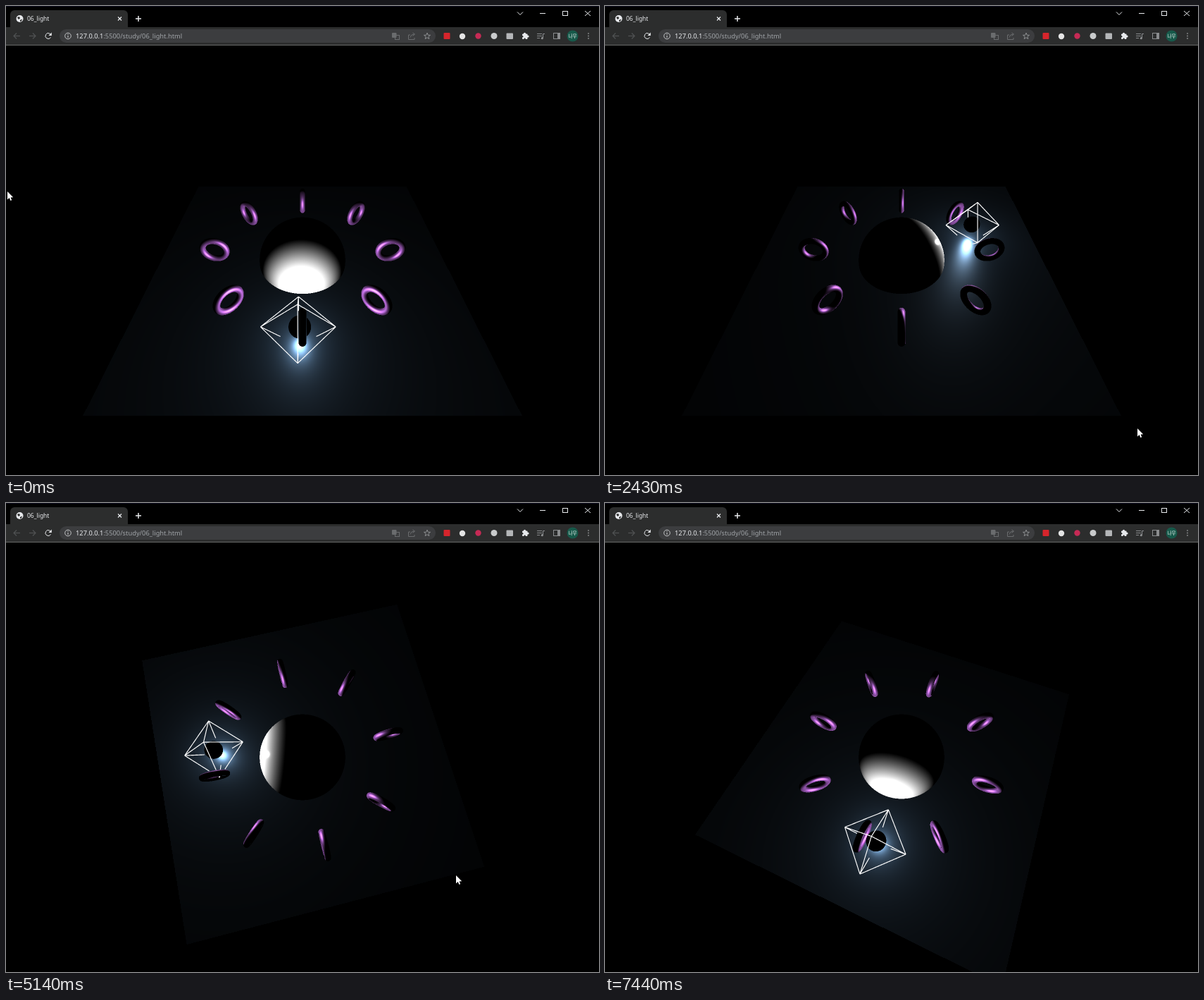
An HTML page with a canvas for the animation above (7.48 s loop, 842 by 665 pixels).

```html
<!DOCTYPE html>
<html lang="en">
<head>
<meta charset="utf-8">
<title>06_light</title>
<style>
  html, body { margin: 0; width: 100%; height: 100%; overflow: hidden; background: #000; }
  canvas { display: block; }
</style>
</head>
<body>
<canvas id="stage" width="842" height="665"></canvas>
<script>
const ctx = document.getElementById('stage').getContext('2d');
const W = 842, H = 609, TOP = 56, LOOP = 7480;
const RAD = Math.PI / 180;
const FOCAL = H / 2 / Math.tan(37.5 * RAD);
const DIST = Math.hypot(7, 7), FAR = 1e9, POWER = 2;
const { sqrt, sin, cos, min, max, floor, ceil } = Math;

// Rows of [time, ...values]
const LIGHT = [[0, -1.43], [1560, 74.5], [2430, 117.9], [4170, 205], [5140, 253.2], [6140, 303.1], [7480, 370.3]];
const ORBIT = [[4630, 90, 45], [5140, 76.4, 9.6], [5280, 75.8, 9.6], [5400, 76.2, 9.6], [6140, 110.3, 22.2], [6300, 112.9, 22.7]];
const MOUSE = [[60, 2, 263], [1560, 541, 542], [2430, 756, 599], [2700, 765, 592], [3870, 765, 592], [4170, 702, 575],
  [4600, 616, 468], [5140, 639, 528], [5280, 640, 528], [5400, 639, 528], [6140, 579, 506], [6300, 575, 505],
  [6560, 774, 610], [6880, 775, 672]];

function keyed(rows, t, ease) {
  if (t <= rows[0][0]) return rows[0].slice(1);
  let i = 1;
  while (i < rows.length && rows[i][0] < t) i++;
  if (i === rows.length) return rows[i - 1].slice(1);
  const a = rows[i - 1], b = rows[i];
  let k = (t - a[0]) / (b[0] - a[0]);
  if (ease) k = k * k * (3 - 2 * k);
  return a.slice(1).map((v, n) => v + (b[n + 1] - v) * k);
}

function material(r, g, b, metal, rough) {
  const base = [r / 255, g / 255, b / 255];
  return {
    rough,
    diff: base.map(c => c * (1 - metal)),
    spec: base.map(c => 0.04 + (c - 0.04) * metal)
  };
}
const GROUND = material(44, 62, 80, 0.5, 0.5);
const WHITE = material(255, 255, 255, 0.2, 0.1);
const PURPLE = material(155, 89, 182, 0.9, 0.5);
const RED = material(231, 76, 60, 0.5, 0.2);

const image = ctx.createImageData(W, H), pix = image.data;
const depth = new Float32Array(W * H);
const cam = { x: 0, y: 0, z: 0, right: [], up: [], fwd: [] };
const rgb = [0, 0, 0], norm = [0, 0, 0];
let lamp = [0, 0, 0];

function lampAt(deg) {
  return [3 * cos(deg * RAD), 0.5, -3 * sin(deg * RAD)];
}

function aim(azimuth, polar) {
  const sa = sin(azimuth * RAD), ca = cos(azimuth * RAD);
  const sp = sin(polar * RAD), cp = cos(polar * RAD);
  cam.x = DIST * sp * sa; cam.y = DIST * cp; cam.z = DIST * sp * ca;
  cam.right = [ca, 0, -sa];
  cam.up = [-cp * sa, sp, -cp * ca];
  cam.fwd = [-sp * sa, -cp, -sp * ca];
}

function project(p) {
  const x = p[0] - cam.x, y = p[1] - cam.y, z = p[2] - cam.z;
  const along = v => x * v[0] + y * v[1] + z * v[2];
  const d = along(cam.fwd);
  return [W / 2 + along(cam.right) * FOCAL / d, H / 2 - along(cam.up) * FOCAL / d, d];
}

// Lambert + GGX under one point light; radius > 0 widens the lobe on tight curves
function shade(px, py, pz, nx, ny, nz, m, radius, t) {
  rgb[0] = rgb[1] = rgb[2] = 0;
  let lx = lamp[0] - px, ly = lamp[1] - py, lz = lamp[2] - pz;
  let s = 1 / sqrt(lx * lx + ly * ly + lz * lz);
  lx *= s; ly *= s; lz *= s;
  const nl = nx * lx + ny * ly + nz * lz;
  if (nl <= 0) return;
  let vx = cam.x - px, vy = cam.y - py, vz = cam.z - pz;
  s = 1 / sqrt(vx * vx + vy * vy + vz * vz);
  vx *= s; vy *= s; vz *= s;
  const nv = max(0.001, nx * vx + ny * vy + nz * vz);
  const hx = lx + vx, hy = ly + vy, hz = lz + vz;
  s = 1 / sqrt(hx * hx + hy * hy + hz * hz);
  const nh = (nx * hx + ny * hy + nz * hz) * s;
  const vh = (vx * hx + vy * hy + vz * hz) * s;
  let rough = m.rough;
  if (radius) rough = min(1, rough + 0.8 * t / (FOCAL * radius * max(nv, 0.3)));
  const a2 = rough * rough * rough * rough;
  const q = nh * nh * (a2 - 1) + 1;
  const vis = 0.5 / (nl * sqrt(a2 + (1 - a2) * nv * nv) + nv * sqrt(a2 + (1 - a2) * nl * nl));
  const lobe = a2 / (q * q) * vis;
  const fr = Math.pow(2, (-5.55473 * vh - 6.98316) * vh);
  for (let c = 0; c < 3; c++)
    rgb[c] = min(1, POWER * nl * (m.diff[c] + lobe * (m.spec[c] * (1 - fr) + fr)));
}

function drawGround() {
  const { right: r, up: u, fwd: f } = cam;
  let k = 0;
  for (let j = 0; j < H; j++) {
    const y = (H / 2 - j - 0.5) / FOCAL;
    for (let i = 0; i < W; i++, k += 4) {
      const x = (i + 0.5 - W / 2) / FOCAL;
      pix[k] = pix[k + 1] = pix[k + 2] = 0;
      pix[k + 3] = 255;
      const dy = f[1] + u[1] * y;
      if (dy >= 0) continue;
      const t = -cam.y / dy;
      const px = cam.x + t * (f[0] + r[0] * x + u[0] * y);
      const pz = cam.z + t * (f[2] + r[2] * x + u[2] * y);
      if (px < -5 || px > 5 || pz < -5 || pz > 5) continue;
      shade(px, 0, pz, 0, 1, 0, GROUND, 0, t);
      pix[k] = rgb[0] * 255;
      pix[k + 1] = rgb[1] * 255;
      pix[k + 2] = rgb[2] * 255;
    }
  }
}

// Each solid: centre, bounding radius, curve radius, material, and a trace
// from the bounding sphere that returns the depth (0 = miss) and sets norm.
function ball(center, r, mat, half) {
  return {
    center, bound: r, curve: r, mat,
    trace(ox, oy, oz, dx, dy, dz, t) {
      const y = oy + dy * t;
      if (half && y < 0) return 0;
      norm[0] = (ox + dx * t) / r;
      norm[1] = y / r;
      norm[2] = (oz + dz * t) / r;
      return t;
    }
  };
}

function ring(deg) {
  const c = cos(deg * RAD), s = sin(deg * RAD);
  return {
    center: [3 * c, 0.5, -3 * s], bound: 0.505, curve: 0.1, mat: PURPLE,
    trace(ox, oy, oz, dx, dy, dz, t, end, len) {
      const u0 = ox * c - oz * s, u1 = dx * c - dz * s;
      const z0 = ox * s + oz * c, z1 = dx * s + dz * c;
      for (let n = 0; n < 40 && t < end; n++) {
        const u = u0 + u1 * t, y = oy + dy * t, z = z0 + z1 * t;
        const k = sqrt(u * u + y * y), q = k - 0.4;
        const e = sqrt(q * q + z * z), gap = e - 0.1;
        if (gap < 0.001) {
          const nu = q * u / k / e, nz = z / e;
          norm[0] = nu * c + nz * s;
          norm[1] = q * y / k / e;
          norm[2] = nz * c - nu * s;
          return t;
        }
        t += gap / len;
      }
      return 0;
    }
  };
}

const rings = Array.from({ length: 8 }, (_, i) => ring(i * 45));
const dome = ball([0, 0, 0], 1.5, WHITE, true);

function drawSolid(o) {
  const { right: r, up: u, fwd: f } = cam;
  const [sx, sy, sd] = project(o.center);
  const reach = o.bound * FOCAL / (sd - o.bound) * 1.15 + 2;
  const ox = cam.x - o.center[0], oy = cam.y - o.center[1], oz = cam.z - o.center[2];
  const cc = ox * ox + oy * oy + oz * oz - o.bound * o.bound;
  const i1 = min(W, ceil(sx + reach)), j1 = min(H, ceil(sy + reach));
  for (let j = max(0, floor(sy - reach)); j < j1; j++) {
    for (let i = max(0, floor(sx - reach)); i < i1; i++) {
      const at = j * W + i;
      let hits = 0, near = FAR, cr = 0, cg = 0, cb = 0;
      for (let n = 0; n < 4; n++) {
        const x = (i + 0.25 + (n & 1) / 2 - W / 2) / FOCAL;
        const y = (H / 2 - j - 0.25 - (n >> 1) / 2) / FOCAL;
        const dx = f[0] + r[0] * x + u[0] * y;
        const dy = f[1] + u[1] * y;
        const dz = f[2] + r[2] * x + u[2] * y;
        const a = dx * dx + dy * dy + dz * dz, b = ox * dx + oy * dy + oz * dz;
        const disc = b * b - a * cc;
        if (disc < 0) continue;
        const root = sqrt(disc);
        const t = o.trace(ox, oy, oz, dx, dy, dz, (-b - root) / a, (-b + root) / a, sqrt(a));
        if (!t || t > depth[at]) continue;
        shade(cam.x + dx * t, cam.y + dy * t, cam.z + dz * t, norm[0], norm[1], norm[2], o.mat, o.curve, t);
        hits++;
        near = min(near, t);
        cr += rgb[0]; cg += rgb[1]; cb += rgb[2];
      }
      if (!hits) continue;
      const keep = 1 - hits / 4, k = at * 4;
      pix[k] = pix[k] * keep + cr * 63.75;
      pix[k + 1] = pix[k + 1] * keep + cg * 63.75;
      pix[k + 2] = pix[k + 2] * keep + cb * 63.75;
      if (hits > 1) depth[at] = near;
    }
  }
}

function drawEdge(a, b) {
  const STEPS = 48;
  const point = k => project(a.map((v, i) => v + (b[i] - v) * k / STEPS));
  let open = false;
  for (let n = 0; n <= STEPS; n++) {
    const [x, y, d] = point(n);
    const i = floor(x), j = floor(y);
    const seen = i < 0 || j < 0 || i >= W || j >= H || d < depth[j * W + i];
    if (seen && open) ctx.lineTo(x, y + TOP);
    else if (seen) ctx.moveTo(x, y + TOP);
    open = seen;
  }
}

// Octahedron around the lamp; its lower half stops at the ground
function drawHelper([x, y, z]) {
  const belt = [[x + 1, y, z], [x, y, z + 1], [x - 1, y, z], [x, y, z - 1]];
  ctx.beginPath();
  belt.forEach((p, i) => {
    drawEdge(p, belt[(i + 1) % 4]);
    drawEdge([x, y + 1, z], p);
    drawEdge(p, [(p[0] + x) / 2, 0, (p[2] + z) / 2]);
  });
  ctx.strokeStyle = '#fff';
  ctx.lineWidth = 1.15;
  ctx.stroke();
}

function drawMouse(x, y) {
  poly([[0, 0], [0, 11.5], [2.7, 9.1], [4.4, 13], [6.2, 12.2], [4.6, 8.4], [8.2, 8.3]].map(p => [p[0] + x, p[1] + y]), true);
  ctx.strokeStyle = '#000';
  ctx.lineWidth = 1;
  ctx.stroke();
  ctx.fillStyle = '#fff';
  ctx.fill();
}

function poly(points, close) {
  ctx.beginPath();
  points.forEach(p => ctx.lineTo(p[0], p[1]));
  if (close) ctx.closePath();
}
function line(color, width, ...points) {
  poly(points);
  ctx.strokeStyle = color;
  ctx.lineWidth = width;
  ctx.stroke();
}
function disc(x, y, r, color) {
  ctx.beginPath();
  ctx.arc(x, y, r, 0, 7);
  ctx.fillStyle = color;
  ctx.fill();
}
function circle(x, y, r, color, from = 0, to = 7) {
  ctx.beginPath();
  ctx.arc(x, y, r, from, to);
  ctx.strokeStyle = color;
  ctx.lineWidth = 1;
  ctx.stroke();
}
function box(x, y, w, h, r, color) {
  ctx.beginPath();
  ctx.roundRect(x, y, w, h, r);
  ctx.fillStyle = color;
  ctx.fill();
}
function frame(x, y, w, h, color) {
  ctx.strokeStyle = color;
  ctx.lineWidth = 1;
  ctx.strokeRect(x, y, w, h);
}
function text(str, x, y, size, color, family = '"Noto Sans", "Open Sans", sans-serif') {
  ctx.font = size + 'px ' + family;
  ctx.fillStyle = color;
  ctx.fillText(str, x, y);
  return x + ctx.measureText(str).width;
}

function drawBrowser() {
  const bar = '#2c2d2d', dim = '#505253', soft = '#8a8c8e', lit = '#e8eaed';
  ctx.fillStyle = '#000';
  ctx.fillRect(0, 0, W, TOP);
  ctx.fillStyle = '#0c0c1c';
  ctx.fillRect(0, 0, W, 1);
  box(6, 6, 167, 30, 6, bar);
  ctx.fillStyle = bar;
  ctx.fillRect(0, 30, W, 25);
  ctx.fillStyle = '#686a69';
  ctx.fillRect(0, 55, W, 1);

  // tab
  disc(19.5, 18, 5, lit);
  poly([[16, 16], [19, 15], [20, 17.5], [18, 19], [17, 18]], true);
  ctx.fillStyle = bar;
  ctx.fill();
  poly([[20, 20], [23, 18.5], [22, 21.5], [20, 22]], true);
  ctx.fill();
  text('06_light', 30, 21, 8.5, lit);
  line(lit, 1.3, [159, 15.5], [164, 20.5]);
  line(lit, 1.3, [164, 15.5], [159, 20.5]);
  line(lit, 1.5, [184, 18], [192, 18]);
  line(lit, 1.5, [188, 14], [188, 22]);

  // window buttons
  line(lit, 1, [726, 8.5], [730, 12.5], [734, 8.5]);
  line(lit, 1, [758, 10.5], [766, 10.5]);
  frame(790.5, 7.5, 7, 6, lit);
  line(lit, 1, [822, 7], [830, 14]);
  line(lit, 1, [830, 7], [822, 14]);

  // navigation
  line(dim, 1.2, [20, 42.5], [11, 42.5]);
  line(dim, 1.2, [15, 38.5], [11, 42.5], [15, 46.5]);
  line(dim, 1.2, [33, 42.5], [42, 42.5]);
  line(dim, 1.2, [38, 38.5], [42, 42.5], [38, 46.5]);
  ctx.lineCap = 'butt';
  circle(60, 42.5, 4, lit, 0.5, 5.6);
  poly([[64.8, 37.5], [64.8, 42], [60.5, 42]], true);
  ctx.fillStyle = lit;
  ctx.fill();

  // address
  box(76, 33, 534, 19, 9.5, '#3c3d3f');
  circle(88, 42.5, 4.3, '#c6c8ca');
  line('#c6c8ca', 1.1, [88, 42], [88, 45]);
  line('#c6c8ca', 1.1, [88, 39.8], [88, 41]);
  const end = text('127.0.0.1', 99, 46, 9.3, lit);
  text(':5500/study/06_light.html', end, 46, 9.3, '#a0a4a8');
  box(548, 38, 6.5, 7, 1, '#6a6c6e');
  frame(552.5, 41.5, 6, 6, '#6a6c6e');
  line('#6a6c6e', 1, [574, 41], [571.5, 41], [571.5, 47.5], [580, 47.5], [580, 45]);
  line('#6a6c6e', 1, [574, 44.5], [576, 41], [580, 40]);
  line('#6a6c6e', 1, [577.5, 38], [580.5, 40], [577.5, 42.5]);
  poly(Array.from({ length: 10 }, (_, i) => {
    const r = i % 2 ? 2 : 4.8, a = (i * 36 - 90) * RAD;
    return [598 + r * cos(a), 42.8 + r * sin(a)];
  }), true);
  ctx.strokeStyle = soft;
  ctx.stroke();

  // extensions
  box(621.5, 38, 9, 9, 1, '#d6252c');
  disc(648, 43, 4.2, '#e4e4e4');
  disc(670.5, 42.5, 4.2, '#c62a55');
  disc(693, 42.5, 4.5, '#c9cbcc');
  box(710.5, 38.5, 9.5, 8.5, 1, '#b4b6b8');
  box(733, 39.5, 7.5, 7.5, 1, lit);
  disc(736.5, 39.3, 1.6, lit);
  disc(741, 43, 1.6, lit);
  disc(733.2, 43.3, 1.2, bar);
  disc(736.6, 46.8, 1.2, bar);
  line(soft, 1, [754, 39.5], [761, 39.5]);
  line(soft, 1, [754, 42.5], [761, 42.5]);
  line(soft, 1, [754, 45.5], [758, 45.5]);
  line(soft, 1, [765, 39.5], [762.5, 39.5], [762.5, 45.5]);
  disc(761.3, 45.7, 1.6, soft);
  frame(777.5, 38.5, 9, 8, soft);
  ctx.fillStyle = soft;
  ctx.fillRect(783, 39, 3, 8);
  disc(804.5, 42.5, 8, '#17594a');
  ctx.textAlign = 'center';
  text('나무', 804.5, 45, 6.5, '#fff', '"Noto Sans CJK KR", "Noto Sans CJK", sans-serif');
  ctx.textAlign = 'left';
  for (const y of [39, 42.5, 46]) disc(827, y, 0.9, soft);
}

function render(t) {
  const [deg] = keyed(LIGHT, t);
  lamp = lampAt(deg);
  aim(...keyed(ORBIT, t, true));
  depth.fill(FAR);
  drawGround();
  drawSolid(dome);
  rings.forEach(drawSolid);
  drawSolid(ball(lamp, 0.3, RED));
  ctx.putImageData(image, 0, TOP);
  // the wire shape trails the lamp by one display tick
  drawHelper(lampAt(deg - 50 / 60));
  if (t < 6880) drawMouse(...keyed(MOUSE, t, true));
}

drawBrowser();
const start = performance.now();
function tick() {
  render((performance.now() - start) % LOOP);
  requestAnimationFrame(tick);
}
tick();
</script>
</body>
</html>
```
